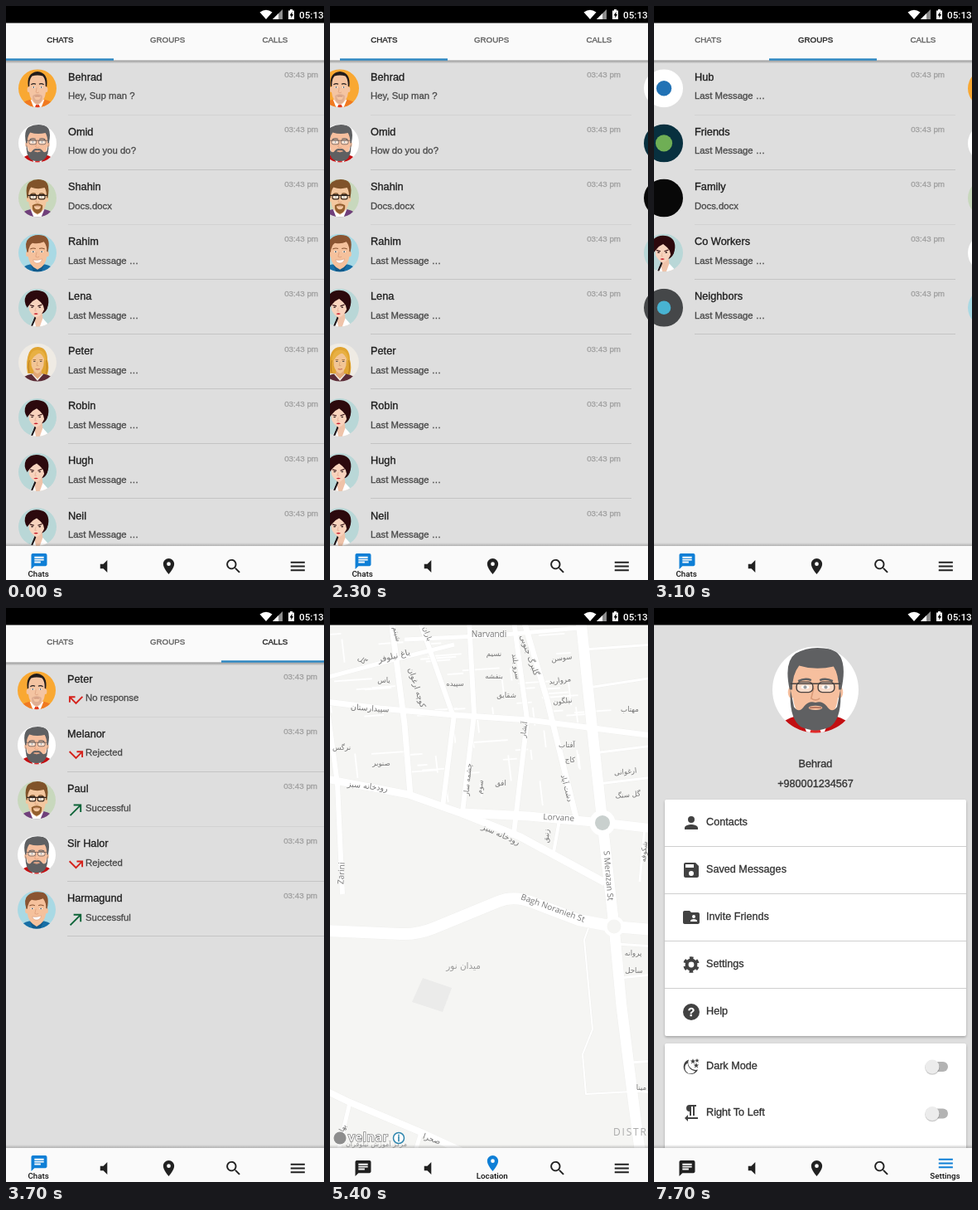
An HTML page for the animation above (8000 ms loop, 384 by 692 pixels).

```html
<!DOCTYPE html>
<html lang="en">
<head>
<meta charset="utf-8">
<title>Messenger tour</title>
<style>
html, body { margin: 0; width: 100%; height: 100%; overflow: hidden; background: #000; }
svg { display: block; width: 384px; height: 692px; }
text { font-family: "Liberation Sans", Arial, sans-serif; white-space: pre; }
.ui { font-family: Roboto, sans-serif; font-weight: 500; stroke: none; }
.street { font-family: "Open Sans", "DejaVu Sans", sans-serif; stroke: none; }
.fa { font-family: "DejaVu Sans", sans-serif; stroke: none; }
</style>
</head>
<body>
<svg id="stage" viewBox="0 0 384 692"></svg>
<script>
const LOOP = 8000, STEP = 100, PITCH = 390, ROW = 66.1;
const INK = '#212121', BLUE = '#0f7fd6', GRAY = '#dedede', BAR = '#fafafa';

const rect = (x, y, w, h, fill, extra = '') =>
  `<rect x="${x}" y="${y}" width="${w}" height="${h}" fill="${fill}" ${extra}/>`;
const circle = (x, y, r, fill, extra = '') =>
  `<circle cx="${x}" cy="${y}" r="${r}" fill="${fill}" ${extra}/>`;
const oval = (x, y, rx, ry, fill) => `<ellipse cx="${x}" cy="${y}" rx="${rx}" ry="${ry}" fill="${fill}"/>`;
const path = (d, fill, extra = '') => `<path d="${d}" fill="${fill}" ${extra}/>`;
const line = (d, color, width, extra = '') =>
  `<path d="${d}" fill="none" stroke="${color}" stroke-width="${width}" ${extra}/>`;
const text = (x, y, s, size, fill, extra = '') =>
  `<text x="${x}" y="${y}" font-size="${size}" fill="${fill}" stroke="${fill}" stroke-width=".32" ${extra}>${s}</text>`;
const MID = 'text-anchor="middle"';

// 24-unit icons
const ICON = {
  chat: 'M20 2H4c-1.1 0-2 .9-2 2v18l4-4h14c1.1 0 2-.9 2-2V4c0-1.1-.9-2-2-2zM6 9h12v2H6V9zm8 5H6v-2h8v2zm4-6H6V6h12v2z',
  mute: 'M7 9v6h4l5 5V4l-5 5H7z',
  place: 'M12 2C8.13 2 5 5.13 5 9c0 5.25 7 13 7 13s7-7.75 7-13c0-3.87-3.13-7-7-7zm0 9.5a2.5 2.5 0 0 1 0-5 2.5 2.5 0 0 1 0 5z',
  search: 'M15.5 14h-.79l-.28-.27A6.5 6.5 0 1 0 13.73 14.43l.27.28v.79l5 4.99L20.49 19zm-6 0a4.5 4.5 0 1 1 0-9 4.5 4.5 0 0 1 0 9z',
  menu: 'M3 18h18v-2H3v2zm0-5h18v-2H3v2zm0-7v2h18V6H3z',
  missed: 'M19.59 7L12 14.59 6.41 9H11V7H3v8h2v-4.59l7 7 9-9z',
  rejected: 'M3 8.41l9 9 7-7V15h2V7h-8v2h4.59L12 14.59 4.41 7z',
  made: 'M9 5v2h6.59L4 18.59 5.41 20 17 8.41V15h2V5z',
  person: 'M12 12a4 4 0 1 0 0-8 4 4 0 0 0 0 8zm0 2c-2.67 0-8 1.34-8 4v2h16v-2c0-2.66-5.33-4-8-4z',
  save: 'M17 3H5c-1.1 0-2 .9-2 2v14c0 1.1.9 2 2 2h14c1.1 0 2-.9 2-2V7l-4-4zm-5 16a3 3 0 1 1 0-6 3 3 0 0 1 0 6zm3-10H5V5h10v4z',
  folder: 'M20 6h-8l-2-2H4c-1.1 0-2 .9-2 2v12c0 1.1.9 2 2 2h16c1.1 0 2-.9 2-2V8c0-1.1-.9-2-2-2zm-5 3a2 2 0 1 1 0 4 2 2 0 0 1 0-4zm4 8h-8v-1c0-1.33 2.67-2 4-2s4 .67 4 2z',
  rtl: 'M10 10v5h2V4h2v11h2V4h2V2h-8a4 4 0 0 0 0 8zm-2 7v-3l-4 4 4 4v-3h12v-2z',
  moon: 'M9 4a9 9 0 1 0 11 12A9 9 0 0 1 9 4zM7.5 8a10.5 10.5 0 0 0 9.5 10A7 7 0 1 1 7.5 8z'
};
const place = (cx, cy, k, body) =>
  `<g transform="translate(${cx} ${cy}) scale(${k}) translate(-12 -12)">${body}</g>`;
const icon = (name, cx, cy, k, fill) => place(cx, cy, k, path(ICON[name], fill, 'fill-rule="evenodd"'));

// Avatars, drawn in a 100-unit circle
const FACE = 'M23 32Q24 9 50 9T77 32L76 60Q73 84 50 94Q27 84 24 60Z';
const eyes = (y, c) => [38, 62].map(x => oval(x, y, 4.6, 2, '#fff') + circle(x, y, 2, c)).join('');
const HAIR = {
  short: 'M21 46Q15 9 50 6Q85 9 79 46L75 44Q76 27 67 18Q50 13 33 18Q24 27 25 44Z',
  thick: 'M20 50Q13 18 27 8Q44 -2 67 3Q89 9 80 50H77Q77 32 71 23Q50 28 31 22Q23 32 23 50Z',
  swept: 'M21 48Q13 22 25 13Q40 -1 68 5Q88 12 79 48L76 46Q77 32 68 21Q52 28 36 24Q27 28 24 48Z'
};
const BEARD = 'M21 50L25 70Q31 78 37 69Q43 62 50 65Q57 62 63 69Q69 78 75 70L79 50Q81 83 67 93Q50 101 33 93Q19 83 21 50Z';
const GOATEE = 'M35 69Q50 60 65 69Q67 87 50 92Q33 87 35 69ZM40 72Q50 67 60 72Q59 80 50 80T40 72Z';

function man(o) {
  const lens = x => rect(x, 41, 19, 12, '#ffffff70', `rx="5" stroke="${o.frame}" stroke-width="${o.fw}"`);
  return rect(0, 0, 100, 100, o.bg) +
    path('M2 100Q10 84 30 80H70Q90 84 98 100Z', o.coat) +
    path('M32 80L40 100H60L68 80Z', o.shirt || '#fff') +
    (o.tie ? path('M46 93H54L57 101H43Z', o.tie) : '') +
    `<g transform="translate(50 0) scale(${o.w || 1} 1) translate(-50 0)">` +
    oval(22, 53, 4, 7, o.skin) + oval(78, 53, 4, 7, o.skin) + path(FACE, o.skin) +
    (o.full ? path(BEARD, o.hair) + oval(50, 71, 8, 2.5, o.skin) : '') +
    (o.goatee ? path(GOATEE, o.goatee, 'fill-rule="evenodd"') : '') +
    path(HAIR[o.cut], o.hair) +
    line('M30 40Q38 36 45 39M55 39Q62 36 70 40', o.hair, 2.4) + eyes(47, '#4a5458') +
    line('M48 48L45 60Q50 64 55 60', '#d99a78', 1.6) +
    (o.smile ? path('M38 68Q50 71 63 66Q60 77 50 77T38 68Z', '#fff', 'stroke="#c9876a"') : line('M43 71Q50 70 57 71', '#b0705a', 1.6)) +
    (o.frame ? lens(28) + lens(53) + line('M21 43H79', o.frame, o.fw) : '') + '</g>';
}

const woman = () => rect(0, 0, 100, 100, '#b9d7d7') +
  path('M42 60H62L64 80L80 100H34L42 84Z', '#efc3a9') +
  path('M64 78L84 100H56Z', '#fff') + path('M42 82L28 100H46Z', '#fff') +
  line('M34 100L41 84L45 74', '#1a1216', 4.5) +
  path('M58 30Q80 34 76 50Q72 62 62 66Z', '#2c090d') +
  path('M27 36Q48 18 67 36L68 54Q62 69 47 77Q34 69 28 56Z', '#f8d3bd') +
  path('M23 50Q12 34 20 18Q32 2 54 5Q80 9 79 36Q78 52 69 60L65 44Q58 34 48 27Q36 32 29 42Z', '#2c090d') +
  line('M30 43L41 46M51 46L62 42', '#2c090d', 2.4) +
  oval(36, 49, 3, 1.7, '#33211f') + oval(56, 49, 3, 1.7, '#33211f') +
  line('M46 50L43 59H48', '#dca68c', 1.4) + path('M40 66Q46 63 52 66Q46 70 40 66Z', '#c81f2d');

const blonde = () => rect(0, 0, 100, 100, '#efebe4') +
  path('M24 78Q18 48 28 24Q36 8 52 9Q76 11 76 42Q82 64 76 82Z', '#e0a431') +
  path('M4 100Q12 84 36 80H66Q90 84 96 100Z', '#5a2b36') + path('M34 80L50 98L66 80Z', '#f2ede6') +
  path('M41 64H60L61 82L50 93L39 82Z', '#e3a877') +
  path('M33 34Q50 16 68 34L66 58Q62 74 50 79Q38 74 34 58Z', '#f2c596') +
  path('M29 56Q27 18 50 17Q75 18 72 56Q69 36 56 25Q36 32 29 56Z', '#e8b043') +
  line('M29 44Q24 60 29 78M73 44Q77 62 73 80', '#bf8220', 2.4) +
  line('M38 43H46M55 43H63', '#986024', 1.6) +
  oval(42, 47, 3, 1.5, '#5a5048') + oval(59, 47, 3, 1.5, '#5a5048') +
  line('M50 48L48 58H53', '#d09a6a', 1.4) + line('M45 67Q50 69 56 67', '#b9534a', 2);

const badge = (bg, fg, r) => rect(0, 0, 100, 100, bg) + (fg ? circle(50, 50, r, fg) : '');

const AVATAR = {
  dark: man({ bg: '#f9a832', hair: '#231c1b', skin: '#f4c4a2', coat: '#f07a22', tie: '#e23a1c', w: .84, goatee: '#dfae92', cut: 'short' }),
  beard: man({ bg: '#fff', hair: '#5f6062', skin: '#f6bf9e', coat: '#c20f12', tie: '#e02b2b', full: 1, frame: '#4a4341', fw: 1.4, cut: 'thick' }),
  specs: man({ bg: '#c8d8bd', hair: '#80532a', skin: '#f3c79f', coat: '#70407b', goatee: '#94602e', frame: '#33251c', fw: 2.6, w: .9, cut: 'thick' }),
  smile: man({ bg: '#a9d9e4', hair: '#8a5431', skin: '#f5c19c', coat: '#176ea5', shirt: '#125a8a', smile: 1, w: .94, cut: 'swept' }),
  woman: woman(), blonde: blonde(),
  cloud: badge('#fff', '#2172b5', 20), leaf: badge('#08303f', '#6fae55', 22),
  plain: badge('#080808'), steel: badge('#454749', '#48b3d2', 18)
};
const avatar = (kind, cx, cy, r) =>
  `<g transform="translate(${cx - r} ${cy - r}) scale(${r / 50})"><g clip-path="url(#disc)">${AVATAR[kind]}</g></g>`;

// Tab pages
const LAST = 'Last Message …';
const PAGES = [
  [['Behrad', 'Hey, Sup man ?', 'dark'], ['Omid', 'How do you do?', 'beard'], ['Shahin', 'Docs.docx', 'specs'],
   ['Rahim', LAST, 'smile'], ['Lena', LAST, 'woman'], ['Peter', LAST, 'blonde'], ['Robin', LAST, 'woman'],
   ['Hugh', LAST, 'woman'], ['Neil', LAST, 'woman']],
  [['Hub', LAST, 'cloud'], ['Friends', LAST, 'leaf'], ['Family', 'Docs.docx', 'plain'],
   ['Co Workers', LAST, 'woman'], ['Neighbors', LAST, 'steel']],
  [['Peter', 'No response', 'dark', 'missed'], ['Melanor', 'Rejected', 'beard', 'rejected'], ['Paul', 'Successful', 'specs', 'made'],
   ['Sir Halor', 'Rejected', 'beard', 'rejected'], ['Harmagund', 'Successful', 'smile', 'made']]
];

function row([name, note, face, call], i) {
  const y = i * ROW;
  return avatar(face, 38, 99.3 + y, 23) +
    text(75, 89.7 + y, name, 12.75, '#1e1e1e') +
    (call ? icon(call, 85.5, 111 + y, .95, call === 'made' ? '#0c6337' : '#d5221c') : '') +
    text(call ? 97 : 75, 112.3 + y, note, 11.35, '#4a4a4a') +
    text(377, 86 + y, '03:43 pm', 9.8, '#a0a0a0', 'text-anchor="end"') +
    rect(75, Math.round(130.6 + y), 315, 1, i === 0 || i === 2 ? '#d2d2d2' : '#c4c4c4');
}

const lists = `<g id="lists">${rect(0, 20, 384, 632, GRAY)}<g id="pages">` +
  PAGES.map((p, k) => `<g transform="translate(${k * PITCH} 0)">${p.map(row).join('')}</g>`).join('') +
  `</g>${rect(0, 20, 384, 45.5, BAR)}${rect(0, 65.5, 384, 4, 'url(#down)')}` +
  ['CHATS', 'GROUPS', 'CALLS'].map((s, i) => text(65.3 + i * 129.8, 44.3, s, 9.75, '#555', `class="tab" ${MID}`)).join('') +
  rect(0, 63.3, 130, 2.4, '#2a85c0', 'id="mark"') + '</g>';

// Map: [path, width]
const ROADS = [
  ['M-5 389L85 393Q105 394 125 386L203 354Q222 346 245 355L300 376L343 384L390 388', 14],
  ['M303 15L316 140L329 259L343 384L352 480L367 600L375 660', 13],
  ['M160 247L240 251L329 259L390 266', 11], ['M-5 206L95 225L160 248L230 276L332 331', 9],
  ['M74 15L90 140L97 226', 7], ['M108 15L148 128', 6], ['M-5 113L60 121L150 129L240 135L390 154', 7],
  ['M168 15L174 128L160 246L136 240L150 128', 6], ['M-5 84L70 64L150 44', 5], ['M90 38L200 33L300 24', 5],
  ['M222 15L238 135L222 272', 6], ['M234 15L262 110L298 256', 7], ['M-2 130L9 212L15 345', 6],
  ['M277 256L269 300', 4], ['M-5 582L24 596L110 632L160 655', 8], ['M24 596L10 655M110 632L103 655', 5],
  ['M318 175L390 166M324 212L390 204M312 96L390 84M307 50L390 44M380 265L374 330', 3],
  ['M346 405L390 408M350 446L390 442M362 548L390 546M366 582L390 584', 3],
  ['M312 386L307 400L317 508L305 538L309 586L364 583', 2]
];
const STREETS = [
  ['باغ نیلوفر', 78, 61, -14, 10], ['شبنم', 78, 32, 78], ['باران', 115, 32, 70], ['کوچه ارغوان', 102, 97, 72, 9.5],
  ['گل', 37, 65, 40], ['یاس', 65, 90], ['سپیده', 151, 94], ['نسیم', 198, 58], ['بنفشه', 198, 85], ['شقایق', 213, 108],
  ['سرو بلند', 222, 71, 82], ['گلبرگ جنوبی', 238, 58, 70, 9.5], ['سوسن', 280, 63, -8], ['مروارید', 278, 90, -8],
  ['نیلگون', 281, 115, -6], ['مهتاب', 362, 125], ['سپیدارستان', 48, 124, 4, 9.5], ['آبشار', 237, 147, -82],
  ['نرگس', 14, 171], ['صنوبر', 62, 190], ['رودخانه سبز', 45, 218, 7, 9.5], ['چشمه سار', 169, 207, -84],
  ['سوم', 184, 216, -84], ['افق', 206, 214], ['آفتاب', 286, 168], ['کاج', 290, 186], ['دشت آباد', 283, 218, 75],
  ['ارغوانی', 357, 200, -6], ['گل سنگ', 360, 228, -6], ['رودخانه سبز', 205, 276, 24, 9.5], ['زنبق', 264, 275, -85],
  ['شکوفه', 382, 294, -85], ['میدان نور', 161, 435, 0, 10.5, '#9a9a9a'], ['پروانه', 366, 419], ['ساحل', 367, 440],
  ['مینا', 376, 581], ['صحرا', 122, 643, 20, 9.5], ['مرکز آموزش نیلوفران', 56, 649, 0, 8, '#9a9a9a'], ['بهار', 17, 630, -62],
  ['Narvandi', 192, 35, 0, 10], ['Lorvane', 276, 256, 3, 10], ['S Merazan St', 333, 323, 85, 10],
  ['Bagh Noranieh St', 268, 365, 20, 10], ['Zarini', 17, 320, -87, 10]
];

function alleys() {
  let seed = 11, d = '';
  const rnd = () => (seed = seed * 16807 % 2147483647) / 2147483647;
  for (let i = 0; i < 62; i++) {
    const x = rnd() * 300, y = 28 + rnd() * 185, n = 12 + rnd() * 34, flip = rnd() < .4;
    d += flip ? `M${x} ${y}l${n * .08} ${n * .7}` : `M${x} ${y}l${n} ${-n * .07}`;
  }
  return line(d, '#fff', 1.8);
}
const street = ([s, x, y, a = 0, size = 8.6, fill = '#757575']) =>
  text(x, y, s, size, fill, `class="${/[a-z]/.test(s) ? 'street' : 'fa'}" ${MID} transform="rotate(${a} ${x} ${y})"`);

const map = `<g id="map">${rect(0, 20, 384, 632, '#f5f5f3')}<g id="roads">` +
  path('M112 446L147 458L136 487L99 475Z', '#ebebea') + alleys() +
  ROADS.map(([d, w]) => line(d, '#efefed', w + 1, 'stroke-linejoin="round"')).join('') +
  ROADS.map(([d, w]) => line(d, '#fff', w, 'stroke-linejoin="round"')).join('') +
  circle(343, 384, 10.5, '#f5f5f3', 'stroke="#fff" stroke-width="4"') +
  circle(329, 259, 15.5, '#fff') + circle(329, 259, 9, '#c9d0ce') +
  `</g><g id="streets">${STREETS.map(street).join('')}` +
  text(342, 636, 'DISTRICT', 12, '#aaa', 'class="street" letter-spacing="1.8"') +
  circle(12, 639, 7.5, '#8d8d8d') +
  text(22, 643, 'velnar', 14.5, '#fff', 'class="street" font-weight="600" style="stroke:#858585;stroke-width:1.6;paint-order:stroke" letter-spacing=".8"') +
  circle(83, 639, 6.5, '#fff', 'stroke="#2f86ae" stroke-width="1.5"') +
  text(83, 643, 'i', 10.5, '#2f86ae', `${MID} font-weight="700"`) + '</g></g>';

// Settings page
const GLYPH = '#424242';
const gear = circle(12, 12, 5.4, 'none', `stroke="${GLYPH}" stroke-width="4"`) +
  circle(12, 12, 8.2, 'none', `stroke="${GLYPH}" stroke-width="3.2" stroke-dasharray="4.4 4.187" stroke-dashoffset="2.2" transform="rotate(30 12 12)"`);
const help = circle(12, 12, 10, GLYPH) + text(12, 17, '?', 14, '#fff', `${MID} font-weight="700"`);
const star = (x, y, r) => path(`M${x} ${y - r}l${r * .3} ${r * .7}h${r * .7}l${-r * .6} ${r * .5}l${r * .3} ${r * .8}l${-r * .7} ${-r * .5}l${-r * .7} ${r * .5}l${r * .3} ${-r * .8}l${-r * .6} ${-r * .5}h${r * .7}Z`, GLYPH);
const glyph = n => path(ICON[n], GLYPH, 'fill-rule="evenodd"');
const ITEMS = [['Contacts', glyph('person'), 259], ['Saved Messages', glyph('save'), 316], ['Invite Friends', glyph('folder'), 373],
  ['Settings', gear, 430], ['Help', help, 487],
  ['Dark Mode', glyph('moon') + star(14, 6, 3.2) + star(19, 5, 2.6) + star(18, 11, 3.2), 552.5], ['Right To Left', glyph('rtl'), 609]];
const card = (y, h) => rect(13, y + 1.5, 364, h, '#0004', 'rx="2" filter="url(#soft)"') + rect(13, y, 364, h, '#fff', 'rx="2"');
const toggle = y => rect(332, y - 6, 23, 12, '#b3b3b3', 'rx="6"') +
  circle(336, y + 1, 8.8, '#0003') + circle(336, y, 8.5, '#ececec');

const settings = `<g id="settings">${rect(0, 20, 384, 632, GRAY)}${avatar('beard', 195, 98.5, 52)}` +
  text(195, 192, 'Behrad', 12.65, '#333', MID) + text(195, 216, '+980001234567', 12.65, '#333', MID) +
  card(231, 285) + card(525, 150) +
  [287, 344, 401, 458].map(y => rect(13, y, 364, 1, '#cfcfcf')).join('') +
  ITEMS.map(([s, g, y]) => place(45, y, 1, g) + text(63, y + 3, s, 12.65, '#333')).join('') +
  toggle(553) + toggle(609.5) + '</g>';

// Bottom bar and status bar
const NAV = [['chat', 'Chats', 40], ['mute', 'Channels', 118.5], ['place', 'Location', 196.5], ['search', 'Search', 274.7], ['menu', 'Settings', 352.3]];
const nav = rect(0, 647, 384, 4, 'url(#up)') + rect(0, 651, 384, 41, BAR) +
  NAV.map(([n, s, x]) => `<g class="nav"><g>${icon(n, x, 675.5, .95, 'currentColor')}</g>` +
    text(x - .8, 688, s, 9.8, '#111', `class="ui" ${MID}`) + '</g>').join('');
const status = rect(0, 0, 384, 20.5, '#000') +
  path('M306.5 7.5Q314 2 321.5 7.5L314 16Z', '#fff') + path('M322 16L334 4V16Z', '#8d8d8d') + path('M322 16L329 9V16Z', '#fff') +
  path('M343 4H346V5.5H348V16H341V5.5H343ZM345.5 7L342.5 11.5H344.3V14.5L347 10H345.5Z', '#fff', 'fill-rule="evenodd"') +
  text(354, 14.8, '05:13', 11.7, '#fff', 'class="ui"');

const fade = (id, a, b) => `<linearGradient id="${id}" x2="0" y2="1"><stop stop-color="#000" stop-opacity="${a}"/><stop offset="1" stop-color="#000" stop-opacity="${b}"/></linearGradient>`;
const stage = document.getElementById('stage');
stage.innerHTML = `<defs><clipPath id="disc"><circle cx="50" cy="50" r="50"/></clipPath>` +
  `<filter id="soft"><feGaussianBlur stdDeviation="1.5"/></filter>${fade('down', .32, 0)}${fade('up', 0, .2)}</defs>` +
  lists + `<g id="blank">${rect(0, 21, 384, 631, GRAY)}</g>` + map + settings + nav + status;

// Timeline: [ms, page scroll, indicator x]
const SWIPE = [[0, 0, 0], [2100, 2, 1], [2200, 9, 4], [2300, 26, 12], [2400, 120, 35], [2500, 236, 64], [2600, 330, 95],
  [2700, 374, 117], [2800, 386, 127], [2900, 390, 130], [3100, 416, 139], [3200, 540, 170], [3300, 690, 215], [3400, 762, 247], [3500, 781, 260]];
const TAPS = [[-1000, 0], [4100, 1], [4900, 2], [7000, 4]];
const SCREENS = [[0, 'lists'], [4200, 'blank'], [5000, 'map'], [7200, 'settings']];

const $ = id => document.getElementById(id);
const at = (table, t) => table.filter(r => r[0] <= t).pop();
const clamp = v => Math.max(0, Math.min(1, v));
const tabs = [...document.querySelectorAll('.tab')], navs = [...document.querySelectorAll('.nav')];

function draw(t) {
  const [, x, mark] = at(SWIPE, t);
  $('pages').setAttribute('transform', `translate(${-x} 0)`);
  $('mark').setAttribute('x', mark);
  const active = Math.round(mark / 130);
  tabs.forEach((el, i) => {
    const c = i === active ? '#1c1c1c' : '#5a5a5a';
    el.setAttribute('fill', c);
    el.setAttribute('stroke', c);
  });

  const screen = at(SCREENS, t)[1];
  SCREENS.forEach(([, id]) => $(id).style.display = id === screen ? '' : 'none');
  $('roads').setAttribute('opacity', clamp((t - 4950) / 150));
  $('streets').setAttribute('opacity', clamp((t - 5100) / 200));

  const [start, on] = at(TAPS, t);
  const prev = (TAPS[TAPS.findIndex(r => r[0] === start) - 1] || [])[1];
  const p = clamp((t - start + STEP) / 300);
  navs.forEach((el, i) => {
    const k = i === on ? p : i === prev ? 1 - p : 0;
    el.style.color = k > .5 ? BLUE : INK;
    el.firstChild.setAttribute('transform', `translate(0 ${-6 * k})`);
    el.lastChild.setAttribute('opacity', k);
  });
}

function tick() {
  draw(Math.floor(performance.now() % LOOP / STEP) * STEP);
  requestAnimationFrame(tick);
}
tick();
</script>
</body>
</html>
```
